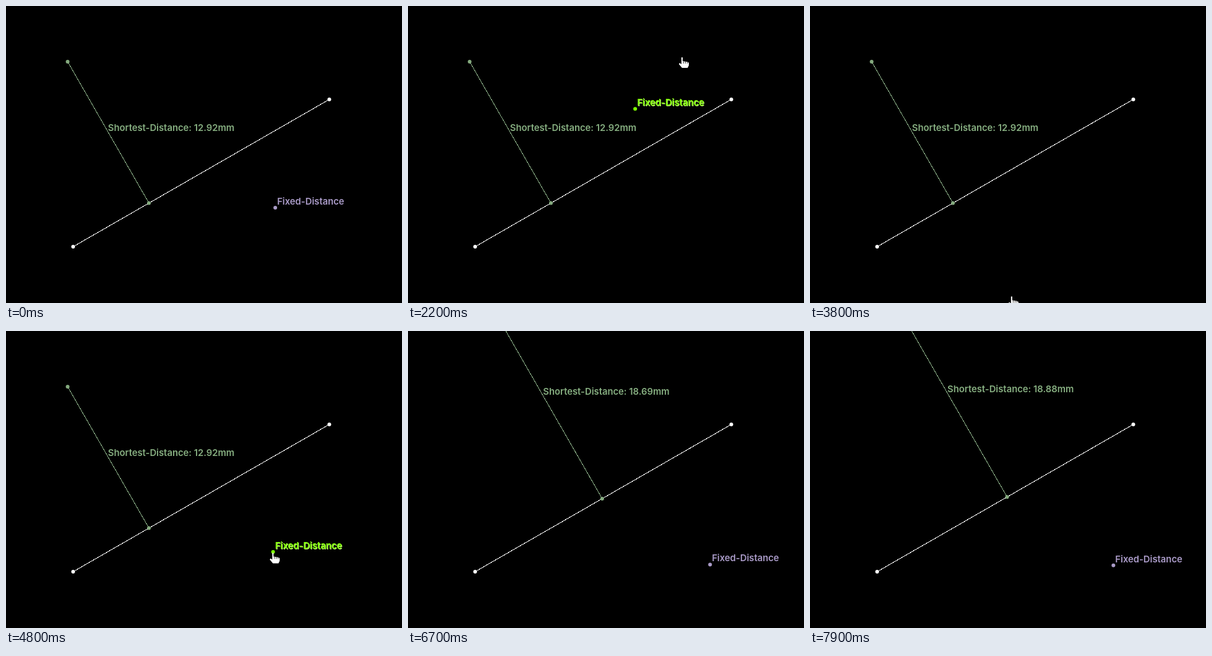
Write an HTML page that moves like this. It is 640 px wide and 480 px high and loops after 8 s.

```html
<!DOCTYPE html>
<html lang="en">
<head>
<meta charset="utf-8">
<title>Distance constraints</title>
<style>
html, body { margin: 0; width: 100%; height: 100%; overflow: hidden; background: #000; }
svg { display: block; width: 640px; height: 480px; }
line { stroke-width: 1; shape-rendering: crispEdges; }
text { font: 600 14.8px Inter, "Open Sans", sans-serif; }
</style>
</head>
<body>
<svg viewBox="0 0 640 480">
  <line x1="108.5" y1="389" x2="522.5" y2="151" stroke="#fff"/>
  <line id="normal" stroke="#8cb088"/>
  <g fill="#fff"><circle cx="108.5" cy="389" r="3"/><circle cx="522.5" cy="151" r="3"/></g>
  <circle id="foot" r="3"/>
  <circle id="free" r="3"/>
  <circle id="fixed" r="3"/>
  <text id="distance" fill="#86ae80"></text>
  <text id="glow" fill="#c6ff7a">Fixed-Distance</text>
  <text id="name">Fixed-Distance</text>
  <g id="hand">
    <path d="M-1 0H1V6L9.500 7.500 11 9V13L9 17H0L-5 11-4 9-1 11Z" fill="#fff"/>
    <path d="M2.500 6.500V10M5.500 7V10M8.500 7.500V10" stroke="#000" stroke-width=".8"/>
  </g>
</svg>
<script>
const LOOP = 8000, STEP = 100, RADIUS = 204.3, PX_PER_MM = 20.4;
const BASE = { x: 231, y: 318.5 }, CORNER = { x: 547, y: 414 };
const TILT = Math.atan2(-238, 414);
const ALONG = { x: Math.cos(TILT), y: Math.sin(TILT) };
const SAGE = '#84aa7e', LIME = '#7cfc00', LILAC = '#aa9bc8';
const GRAB = 1400, RELEASE = 5200, PULL = 6200, TURN = 6950;

// Swing around the foot: time, angle in degrees, reach of the pointer
const swing = [
  [GRAB, 2.1, 204], [2300, -50, 322], [3200, 48.7, 173], [3300, 57.6, 177],
  [3800, 57.6, 177], [4400, 8, 204], [4800, 10.85, 204]
];

const el = id => document.getElementById(id);
const set = (id, attrs) => {
  for (const key in attrs) el(id).setAttribute(key, attrs[key]);
};
const shown = on => on ? 'visible' : 'hidden';
const lerp = (a, b, k) => a + (b - a) * k;
const mix = (p, q, k) => ({ x: lerp(p.x, q.x, k), y: lerp(p.y, q.y, k) });
const polar = (p, r, a) => ({ x: p.x + r * Math.cos(a), y: p.y + r * Math.sin(a) });

function ease(t, from, to) {
  const k = Math.min(1, Math.max(0, (t - from) / (to - from)));
  return k * k * (3 - 2 * k);
}

function sample(keys, t) {
  const i = Math.max(1, keys.findIndex(key => key[0] > t));
  if (t >= keys[keys.length - 1][0]) return keys[keys.length - 1].slice(1);
  const [a, b] = [keys[i - 1], keys[i]];
  const k = ease(t, a[0], b[0]);
  return a.slice(1).map((v, n) => lerp(v, b[n + 1], k));
}

function pointer(t, free, angle, reach) {
  const grip = { x: free.x + 4, y: free.y - 3 };
  if (t >= PULL) return grip;
  const held = polar(BASE, reach, angle);
  held.y += 1.5;
  if (t < GRAB) return mix(CORNER, held, ease(t, 600, 1200));
  return mix(held, grip, ease(t, RELEASE - 100, 6000));
}

function draw(t) {
  // The free end is pulled out, then eased back at constant speed
  const slide = t < TURN ? 129 * ease(t, PULL, TURN) : 129 - (t - TURN) * 0.0295;
  const length = 263.6 + 1.719 * slide - 0.0051 * slide * slide;
  const foot = { x: BASE.x + ALONG.x * slide, y: BASE.y + ALONG.y * slide };
  const free = { x: foot.x + ALONG.y * length, y: foot.y - ALONG.x * length };

  // The fixed point trails the foot, keeping its distance to it
  const [degrees, reach] = sample(swing, t);
  const turn = degrees * Math.PI / 180;
  const half = Math.tan((turn - TILT) / 2) * Math.exp(slide / RADIUS);
  const fixed = polar(foot, RADIUS, TILT + 2 * Math.atan(half));
  const hot = t >= 1200 && t < RELEASE;

  const dot = (id, p, fill) => set(id, { cx: p.x, cy: p.y, fill });
  dot('foot', foot, SAGE);
  dot('free', free, t >= 6000 ? LIME : SAGE);
  dot('fixed', fixed, hot ? LIME : LILAC);
  set('normal', { x1: foot.x, y1: foot.y, x2: free.x, y2: free.y });

  const middle = mix(foot, free, 0.5);
  el('distance').textContent = `Shortest-Distance: ${(length / PX_PER_MM).toFixed(2)}mm`;
  set('distance', { x: middle.x - 0.5, y: middle.y - 2.4 });

  // A label whose anchor leaves the stage is not drawn
  const x = fixed.x + 3, y = fixed.y - 5.2, inside = y < 480;
  set('name', { x, y, fill: hot ? LIME : LILAC, visibility: shown(inside) });
  set('glow', { x: x + 1, y: y + 1, visibility: shown(inside && hot) });

  const tip = pointer(t, free, turn, reach);
  set('hand', { transform: `translate(${tip.x} ${tip.y})`, visibility: shown(t >= 600) });
}

const begin = performance.now();
function tick() {
  const t = (performance.now() - begin) % LOOP;
  draw(Math.floor(t / STEP) * STEP);
  requestAnimationFrame(tick);
}
tick();
</script>
</body>
</html>
```
